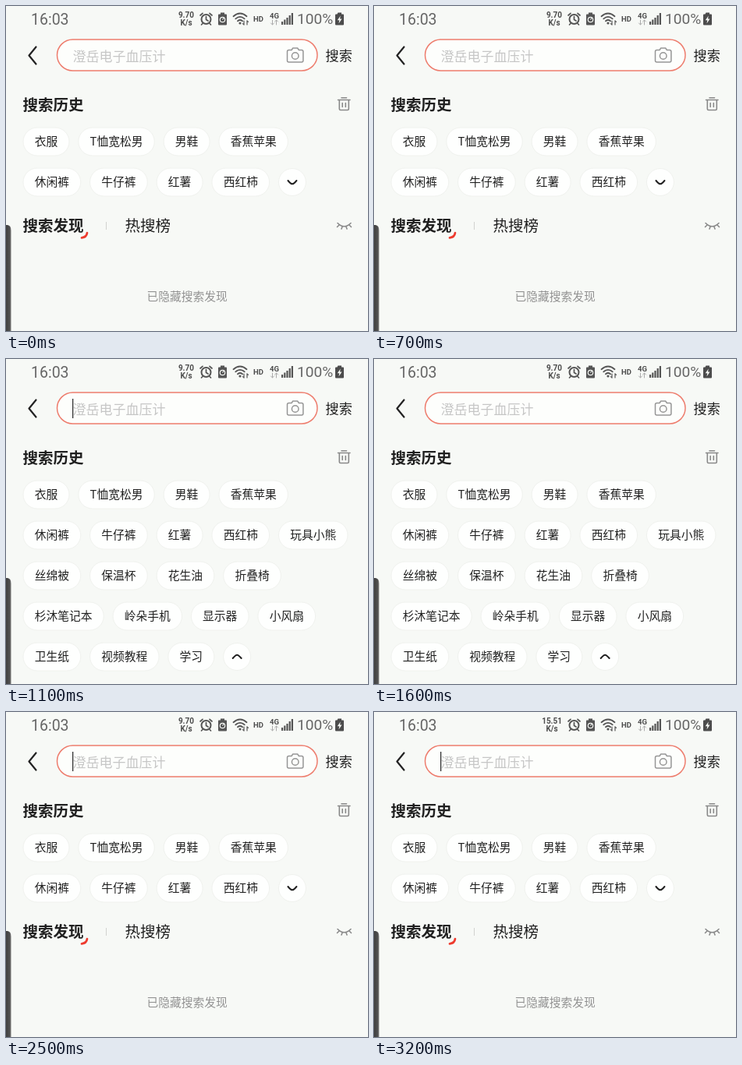
These frames come from a looping animation (464 by 417 pixels, 3300 ms). An HTML page:

```html
<!DOCTYPE html>
<html lang="zh-CN">
<head>
<meta charset="utf-8">
<title>搜索</title>
<style>
  html, body { margin: 0; width: 100%; height: 100%; overflow: hidden; background: #f7f9f6; }
  svg { display: block; width: 464px; height: 417px; }
  text { font-family: "Noto Sans CJK SC", "Noto Sans CJK", sans-serif; fill: #202020; }
  .status text { font-family: Roboto, "Noto Sans", sans-serif; fill: #666; }
  .status .tiny { font-weight: 700; fill: #4c4c4c; }
  .line { fill: none; stroke-linecap: round; stroke-linejoin: round; }
  .title { font-size: 19.5px; }
  .bold { font-weight: 700; }
  .tag { font-size: 14.75px; }
  .pill { fill: #fefffe; stroke: #f0f2ee; stroke-width: 1; }
</style>
</head>
<body>
<svg viewBox="0 0 464 417">
  <defs>
    <linearGradient id="edge">
      <stop offset="0" stop-color="#3e3e3e"/>
      <stop offset=".7" stop-color="#505050"/>
      <stop offset="1" stop-color="#777"/>
    </linearGradient>
  </defs>
  <rect width="464" height="417" fill="#f7f9f6"/>

  <g class="status">
    <text x="32" y="23.5" font-size="19.5">16:03</text>
    <text id="rate" class="tiny" x="241" y="15" font-size="10" text-anchor="end">9.70</text>
    <text id="unit" class="tiny" x="231" y="24.5" font-size="10" text-anchor="middle">K/s</text>

    <g class="line" stroke="#555" stroke-width="2">
      <circle cx="256.5" cy="17" r="6"/>
      <path d="M256.5 13.5V17.5L259 19M249 12L252 9.3M264 12L261 9.3M252 22.5L250.5 24M261 22.5L262.5 24" stroke-width="1.7"/>
    </g>

    <path d="M275 8.5h5v2h2q1 0 1 1v12q0 1-1 1h-9q-1 0-1-1v-12q0-1 1-1h2z" fill="#555"/>
    <circle cx="277.5" cy="17.5" r="3.2" fill="none" stroke="#f7f9f6" stroke-width="1.2"/>
    <path d="M277.5 17.5L279.5 15" stroke="#f7f9f6" stroke-width="1.2"/>

    <g class="line" stroke="#555" stroke-width="1.8">
      <path d="M291.5 13.2Q300 5.8 308.5 13.2M294.3 16.4Q300 11.4 305.7 16.4M297 19.3Q300 16.8 303 19.3"/>
      <path d="M305 19v5M303.5 22.6L305 24.2M309 24v-5M310.5 20.4L309 18.8" stroke-width="1.2"/>
    </g>
    <circle cx="300" cy="22" r="1.6" fill="#555"/>

    <text class="tiny" x="317" y="19.5" font-size="9.5">HD</text>
    <text class="tiny" x="338" y="15.5" font-size="9.5">4G</text>
    <path class="line" d="M341.5 18v6M339.5 22L341.5 24L343.5 22M346.5 24v-6M344.5 20L346.5 18L348.5 20" stroke="#aaa" stroke-width="1"/>
    <path d="M353 20h2.2v4h-2.2zM356.2 17.5h2.2v6.5h-2.2zM359.4 15h2.2v9h-2.2zM362.6 12h2.2v12h-2.2zM365.8 9h2.2v15h-2.2z" fill="#555"/>
    <text x="373" y="23.3" font-size="19.2">100%</text>
    <path d="M425.5 8.5h4.5v2h2q1 0 1 1v12q0 1-1 1h-9q-1 0-1-1v-12q0-1 1-1h1.500z" fill="#4c4c4c"/>
    <path d="M428.700 12.500L424.800 18.300H427.300L426.500 22.500L430.500 16.500H428z" fill="#f7f9f6"/>
  </g>

  <path class="line" d="M38.500 52.500L29.500 63.500L38.500 74.500" stroke="#222" stroke-width="2.200"/>
  <rect x="65.500" y="43" width="333.500" height="40" rx="20" fill="#fdfefc" stroke="#ee7d6e" stroke-width="1.500"/>
  <text x="85.500" y="70.800" font-size="17" style="fill:#c6c6c6">澄岳电子血压计</text>
  <rect id="caret" x="85" y="51" width="1.300" height="25" fill="#333"/>
  <g class="line" stroke="#969696" stroke-width="1.500">
    <path d="M362.500 56.500h3.500l1.700-2.500h6l1.700 2.500h3.500q2 0 2 2v11.500q0 2-2 2h-16.400q-2 0-2-2v-11.500q0-2 2-2z"/>
    <circle cx="370.700" cy="64" r="4.300"/>
  </g>
  <text x="409.500" y="69.800" font-size="17.200">搜索</text>

  <text class="title bold" x="21.500" y="134.300">搜索历史</text>
  <g class="line" stroke="#8a8a8a" stroke-width="1.600">
    <path d="M425.500 120.500h15.500M430 117.700h6.500M427.300 121v11q0 1.500 1.500 1.500h9q1.500 0 1.500-1.500v-11M431.200 124.500v5M435.300 124.500v5"/>
  </g>

  <g id="common"></g>
  <g id="more"></g>

  <g id="found">
    <text class="title bold" x="21.500" y="289.300">搜索发现</text>
    <path class="line" d="M97 297.300Q103.300 296.700 104 291" stroke="#ee3b2e" stroke-width="2.700"/>
    <path d="M128.500 277v10" stroke="#d2d3d0"/>
    <text class="title" x="152.500" y="289.300">热搜榜</text>
    <path class="line" d="M425 278.500Q433.500 287 442 278.500M427 281L424.500 283.500M431 283.300L430 286M436 283.300L437 286M440 281L442.500 283.500" stroke="#8a8a8a" stroke-width="1.600"/>
    <text x="180.500" y="378.300" font-size="14.750" style="fill:#929292">已隐藏搜索发现</text>
  </g>

  <g id="toggle">
    <circle id="disc" class="pill" r="17.500"/>
    <path id="arrow" class="line" d="M-5.500 -2Q-2 2.300 0 2.300T5.500 -2" stroke="#202020" stroke-width="2"/>
  </g>

  <path d="M0 281H2Q6.500 281.500 6.500 288V417H0z" fill="url(#edge)"/>
</svg>
<script>
const LOOP = 3300, SIZE = 14.75, PAD = 14.75, GAP = 11.8;
const $ = id => document.getElementById(id);

function add(parent, name, attrs) {
  const el = document.createElementNS("http://www.w3.org/2000/svg", name);
  for (const key in attrs) el.setAttribute(key, attrs[key]);
  return parent.appendChild(el);
}

const textWidth = word =>
  [...word].reduce((sum, c) => sum + (c < "\u0080" ? 9 : SIZE), 0);

// Lays tags out from left to right and returns the next free x.
function addRow(group, y, words, x = 22) {
  for (const word of words) {
    const width = textWidth(word) + 2 * PAD;
    add(group, "rect", { class: "pill", x, y: y - 18, width, height: 36, rx: 18 });
    add(group, "text", { class: "tag", x: x + PAD, y: y + 5.4 }).textContent = word;
    x += width + GAP;
  }
  return x;
}

addRow($("common"), 174, ["衣服", "T恤宽松男", "男鞋", "香蕉苹果"]);
const foldX = addRow($("common"), 226, ["休闲裤", "牛仔裤", "红薯", "西红柿"]);
addRow($("more"), 226, ["玩具小熊"], foldX);
addRow($("more"), 278, ["丝绵被", "保温杯", "花生油", "折叠椅"]);
addRow($("more"), 330, ["杉沐笔记本", "岭朵手机", "显示器", "小风扇"]);
const openX = addRow($("more"), 382, ["卫生纸", "视频教程", "学习"]);

const CARET_ON = [[100, 600], [1100, 1600], [2100, 2700], [3200, LOOP]];
const within = (t, [from, to]) => t >= from && t < to;
const show = (id, on) => { $(id).style.display = on ? "" : "none"; };

function draw(t) {
  const open = within(t, [1100, 2500]);
  const pressed = within(t, [1000, 1100]);
  const fast = t >= 2700;

  show("caret", CARET_ON.some(span => within(t, span)));
  show("more", open);
  show("found", !open);

  const [x, y] = open ? [openX + 17.5, 382] : [foldX + 17.5, 226];
  $("toggle").setAttribute("transform", `translate(${x} ${y})`);
  $("arrow").setAttribute("transform", open ? "scale(1 -1)" : "");
  $("disc").style.fill = pressed ? "#e3e5e2" : "";
  $("disc").style.stroke = pressed ? "#e3e5e2" : "";

  $("rate").textContent = fast ? "15.51" : "9.70";
  $("unit").setAttribute("x", fast ? 228 : 231);
}

const start = performance.now();
function tick() {
  draw((performance.now() - start) % LOOP);
  requestAnimationFrame(tick);
}
tick();
</script>
</body>
</html>
```
